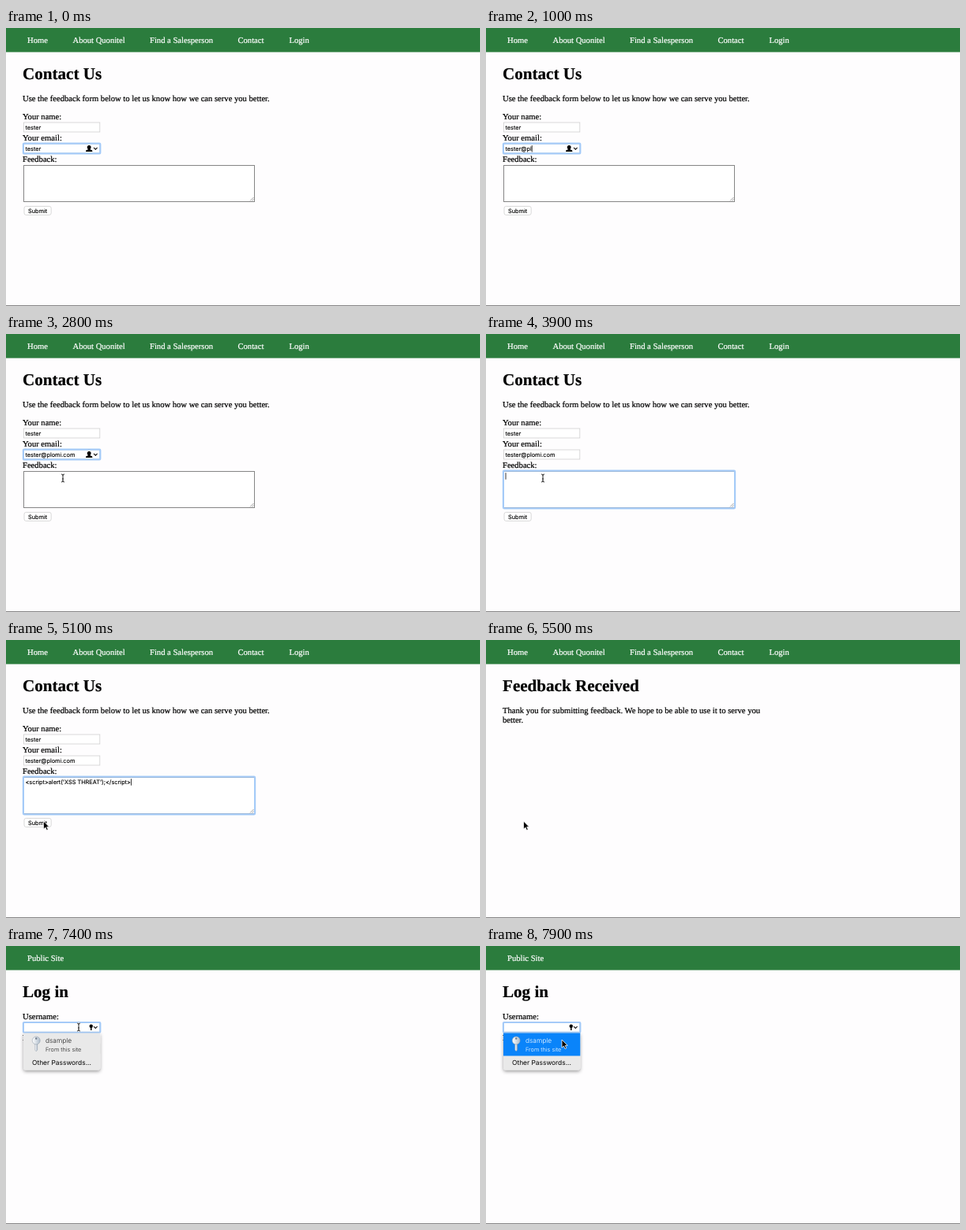
An HTML page for the animation above (8 s loop, 600 by 353 pixels).

```html
<!DOCTYPE html>
<html lang="en">
<head>
<meta charset="utf-8">
<title>Feedback form</title>
<style>
  html, body { margin: 0; width: 100%; height: 100%; overflow: hidden; background: #fefdfe; }
  svg { display: block; width: 600px; height: 353px; color: #000; }
  text {
    font: 10.6px "Liberation Serif", serif; text-rendering: geometricPrecision; white-space: pre;
    fill: currentColor; stroke: currentColor; stroke-width: .22;
  }
  .title { font-size: 21.1px; font-weight: bold; }
  .nav { color: #fff; }
  .ui { font: 7.333px Inter, sans-serif; stroke-width: .14; }
  .menu { font: 8.4px Inter, sans-serif; stroke: none; }
  #rowText text { font-weight: 300; stroke: none; }
  .field { fill: #fff; stroke: #cfcfcf; stroke-width: .8; }
  .area { fill: #fff; stroke: #858585; }
  .ring { fill: none; stroke: #a5cbf8; stroke-width: 2.2; }
  .glyph { fill: none; stroke: #111; stroke-width: 1.1; }
  .hidden { display: none; }
</style>
</head>
<body>
<svg id="stage" viewBox="0 0 600 353">
  <defs>
    <linearGradient id="silver"><stop stop-color="#fff"/><stop offset="1" stop-color="#aebccb"/></linearGradient>
    <filter id="shadow" x="-20%" y="-20%" width="140%" height="150%">
      <feDropShadow dx="0" dy="2" stdDeviation="2" flood-opacity=".38"/>
    </filter>
  </defs>
  <rect width="600" height="353" fill="#fefdfe"/>
  <rect width="600" height="30.6" fill="#2b7c3d"/>
  <rect y="352" width="600" height="1" fill="#858585"/>
  <g id="pages"></g>
  <g id="arrow">
    <path d="M0 0V10.2L2.4 8L4 11.5L5.8 10.7L4.2 7.3H7.2Z" fill="#000" stroke="#fff" stroke-width=".8"/>
  </g>
  <g id="beam" fill="none">
    <path d="M-2-5Q0-5 0-3.5Q0-5 2-5M0-4V4M-2 5Q0 5 0 3.5Q0 5 2 5M-1 1H1" stroke="#fff" stroke-width="2"/>
    <path d="M-2-5Q0-5 0-3.5Q0-5 2-5M0-4V4M-2 5Q0 5 0 3.5Q0 5 2 5M-1 1H1" stroke="#111" stroke-width=".9"/>
  </g>
</svg>
<script>
const LOOP = 8000, STEP = 100;
const $ = id => document.getElementById(id);

const label = (x, y, str, cls = '') => `<text x="${x}" y="${y}" class="${cls}">${str}</text>`;
const field = y => `<rect class="field" x="22.4" y="${y}" width="96.4" height="12"/>`;
const ring = (id, y, w, h) =>
  `<rect id="${id}" class="ring" x="21.9" y="${y}" width="${w}" height="${h}" rx="1"/>`;
const button = (id, y) => `
  <rect id="${id}" x="23" y="${y}" width="34.2" height="11" rx="2.4" fill="#fff" stroke="#d0d0d0" stroke-width=".8"/>
  <text id="${id}Text" class="ui" x="40" y="${y + 8.1}" text-anchor="middle">Submit</text>`;
const chevron = (x, y) => `<path class="glyph" d="M${x - 2.3} ${y - 1.1}l2.3 2.3l2.3-2.3"/>`;

const publicNav = [[27, 'Home'], [84.5, 'About Quonitel'], [182, 'Find a Salesperson'],
  [293.5, 'Contact'], [358.5, 'Login']].map(([x, s]) => label(x, 18.6, s, 'nav')).join('');

$('pages').innerHTML = `
  <g id="publicNav">${publicNav}</g>
  <g id="contact">
    ${label(21, 65, 'Contact Us', 'title')}
    ${label(21, 93.4, 'Use the feedback form below to let us know how we can serve you better.')}
    ${label(21, 116, 'Your name:')}${field(120)}${label(24.5, 128.8, 'tester', 'ui')}
    ${label(21, 143, 'Your email:')}${field(147)}
    <g id="emailFocus">
      ${ring('emailRing', 146.6, 97.4, 12.8)}
      <path d="M101 157c0-2 1-2.2 3-2.8c-2.2-2.4-1.3-5.2 1.2-5.2s3.4 2.8 1.2 5.2c2 .6 3 .8 3 2.8z"/>
      ${chevron(113.3, 153)}
    </g>
    <text id="email" class="ui" x="24.5" y="155.8"></text>
    ${label(21, 170, 'Feedback:')}
    <rect class="area" x="22.5" y="174.5" width="292" height="46"/>
    ${ring('areaRing', 173.7, 293.2, 47.6)}
    <path d="M309 219.5l4.5-4.5M311.5 219.5l2-2" stroke="#777" stroke-width=".7"/>
    <text id="message" class="ui" x="24.5" y="182.8"></text>
    <rect id="caret" width=".8" height="8.5"/>
    ${button('send', 226.4)}
  </g>
  <g id="thanks">
    ${label(21, 65, 'Feedback Received', 'title')}
    ${label(21, 93.4, 'Thank you for submitting feedback. We hope to be able to use it to serve you')}
    ${label(21, 105.2, 'better.')}
  </g>
  <g id="login">
    ${label(27, 18.6, 'Public Site', 'nav')}
    ${label(21, 65, 'Log in', 'title')}
    ${label(21, 93.4, 'Username:')}${field(97.3)}
    ${label(21, 120.4, 'Password:')}${field(124.3)}
    ${button('enter', 140)}
    <g id="userFocus">
      ${ring('userRing', 97, 97.4, 12.8)}
      <circle cx="107.7" cy="101.7" r="2.2"/><path d="M107 103h1.5v4h-1.5z"/>
      ${chevron(113.3, 103.2)}
    </g>
    <g id="menu">
      <path d="M22 110.5H119.3V154q0 3.5-3.5 3.5H25.5q-3.5 0-3.5-3.5Z" fill="#e9e9e9" filter="url(#shadow)"/>
      <rect id="row" x="22" y="110.5" width="97.3" height="29" fill="#0a84fa"/>
      <path d="M36.7 123h3v9l-1.5 1.8l-1.5-1.8z" fill="url(#silver)" stroke="#7b8997" stroke-width=".4"/>
      <circle cx="38.2" cy="120" r="5" fill="url(#silver)" stroke="#8794a2" stroke-width=".5"/>
      <circle cx="38.2" cy="117.5" r="1.2" fill="#6f7d8c"/>
      <g id="rowText">${label(50, 123.2, 'dsample', 'menu')}${label(50, 133.5, 'From this site', 'ui')}</g>
      ${label(33, 151.3, 'Other Passwords...', 'menu')}
    </g>
  </g>`;

const ADDRESS = 'tester@plomi.com';
const KEY_TIMES = [200, 600, 1000, 1400, 1500, 1600, 1800, 2100, 2200, 2300];
const SCRIPT = "<script>alert('XSS THREAT');<\/script>";
const PASTE = 4100, AREA_FOCUS = 2900;

// Pointer path: time, x, y
const PATH = [[2500, 112, 166], [2800, 72, 183], [4400, 72, 183], [4700, 56, 222], [4900, 48, 240],
  [5100, 47.5, 230], [5600, 47.5, 230], [6200, 372, 15], [6500, 378, 15], [6700, 382, 17],
  [6800, 382, 17], [7200, 92, 103], [7500, 92, 103], [7700, 96, 117], [7900, 96, 119]];

function pointerAt(t) {
  const i = PATH.findIndex(p => p[0] > t);
  if (i < 0) return PATH[PATH.length - 1].slice(1);
  if (i === 0) return PATH[0].slice(1);
  const [t0, x0, y0] = PATH[i - 1], [t1, x1, y1] = PATH[i];
  const u = (t - t0) / (t1 - t0), e = u * u * (3 - 2 * u);
  return [x0 + (x1 - x0) * e, y0 + (y1 - y0) * e];
}

const show = (id, on) => $(id).classList.toggle('hidden', !on);
const during = (t, from, to) => t >= from && t < to;

function drawCaret(t) {
  const inArea = t >= AREA_FOCUS;
  const reset = t >= PASTE ? PASTE : inArea ? AREA_FOCUS : KEY_TIMES.filter(k => k <= t).pop();
  const lit = reset !== undefined && (t - reset) % 1000 < 500;
  show('caret', lit && (inArea || t < 2500));
  const box = $(inArea ? 'message' : 'email');
  const length = box.textContent ? box.getComputedTextLength() : 0;
  $('caret').setAttribute('x', 24.6 + length);
  $('caret').setAttribute('y', inArea ? 176.2 : 149);
}

function draw(t) {
  show('publicNav', t < 6500);
  show('contact', t < 5500);
  show('thanks', during(t, 5500, 6500));
  show('login', t >= 6500);

  if (t < 5500) {
    $('email').textContent = ADDRESS.slice(0, 6 + KEY_TIMES.filter(k => k <= t).length);
    $('message').textContent = t >= PASTE ? SCRIPT : '';
    show('emailFocus', t < AREA_FOCUS);
    show('areaRing', t >= AREA_FOCUS);
    const pressed = t >= 5300;
    $('send').setAttribute('fill', pressed ? '#3b8df5' : '#fff');
    $('sendText').style.color = pressed ? '#fff' : '#000';
    drawCaret(t);
  }

  show('userFocus', t >= 7300);
  show('menu', t >= 7400);
  show('row', t >= 7700);
  $('rowText').style.color = t >= 7700 ? '#fff' : '#222';

  const beam = during(t, 2600, 4500) || during(t, 7200, 7600);
  const visible = t >= 2500 && !during(t, PASTE, 4400);
  show('beam', visible && beam);
  show('arrow', visible && !beam);
  const [x, y] = pointerAt(t);
  for (const id of ['beam', 'arrow']) $(id).setAttribute('transform', `translate(${x} ${y})`);
}

const start = performance.now();
function tick() {
  const t = (performance.now() - start) % LOOP;
  draw(Math.floor(t / STEP) * STEP);
  requestAnimationFrame(tick);
}
tick();
</script>
</body>
</html>
```
